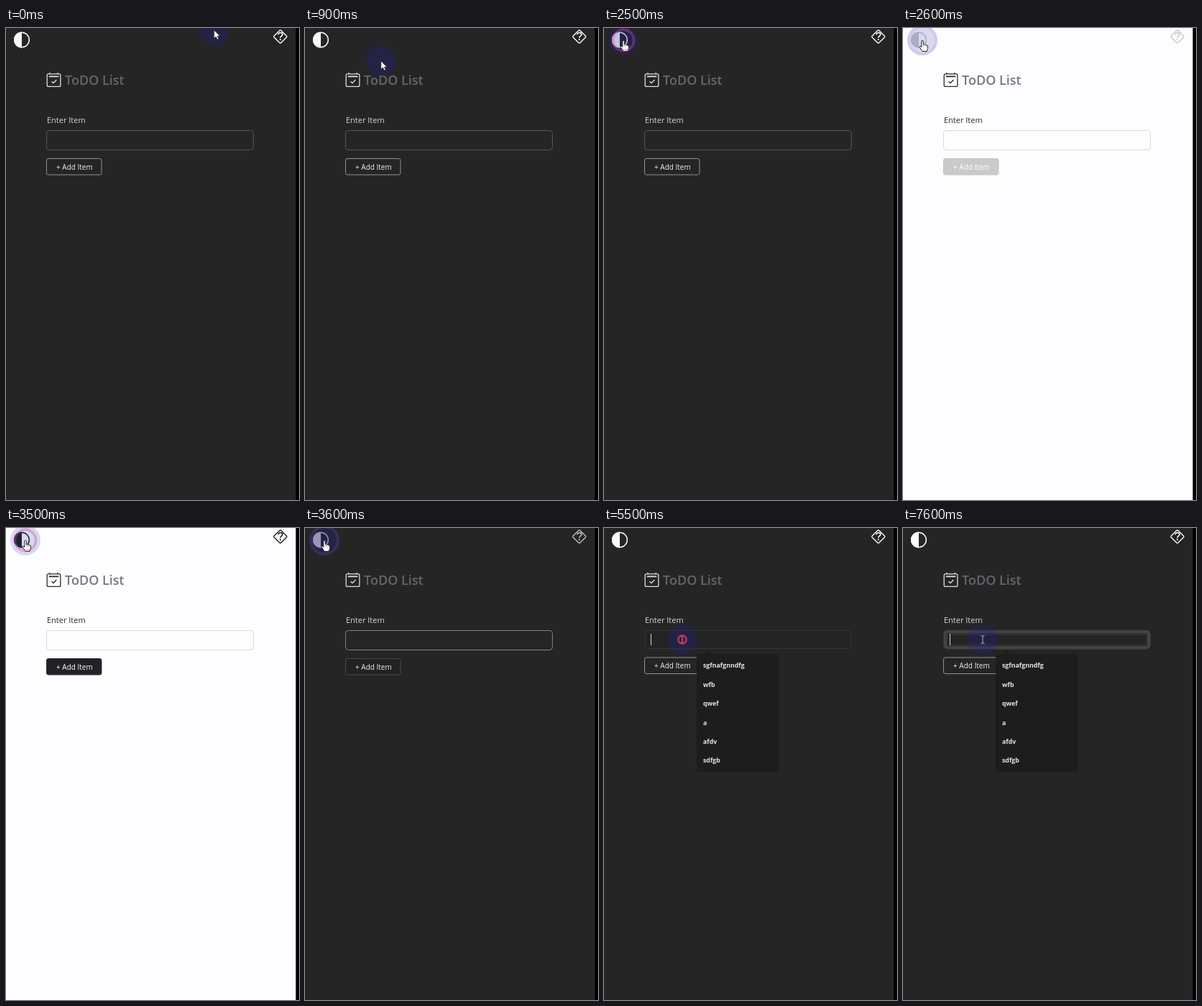
Write an HTML page with a canvas that moves like this. It is 408 by 656 pixels and loops after 8 s.

```html
<!DOCTYPE html>
<html lang="en">
<head>
<meta charset="utf-8">
<title>ToDO List</title>
<style>
  html, body { margin: 0; width: 100%; height: 100%; overflow: hidden; background: #000; }
  canvas { display: block; width: 408px; height: 656px; }
</style>
</head>
<body>
<canvas id="stage" width="408" height="656"></canvas>
<script>
const ctx = document.getElementById('stage').getContext('2d');
const LOOP = 8000;
const THEME_TO_LIGHT = 2550, THEME_TO_DARK = 3550, FOCUS = 5500;
const CLICKS = [2300, 3300, FOCUS];
const SUGGESTIONS = ['sgfnafgnndfg', 'wfb', 'qwef', 'a', 'afdv', 'sdfgb'];
// time, x, y of the pointer
const PATH = [
  [0, 290, 3], [450, 190, 29], [900, 106, 46], [1400, 50, 31], [1800, 27, 17],
  [3800, 27, 17], [3950, 66, 84], [4200, 109, 155], [5500, 109, 155], [5700, 111, 155]
];

const ramp = (t, from, to) => Math.max(0, Math.min(1, (t - from) / (to - from)));
const mix = (a, b, k) => a + (b - a) * k;
const gray = v => `rgb(${v},${v},${v})`;

function pointerAt(t) {
  const next = PATH.findIndex(p => p[0] > t);
  if (next < 0) return PATH[PATH.length - 1].slice(1);
  const a = PATH[next - 1], b = PATH[next], k = ramp(t, a[0], b[0]);
  return [mix(a[1], b[1], k), mix(a[2], b[2], k)];
}

function text(str, x, y, size, weight, color) {
  ctx.font = `${weight} ${size}px "Open Sans", "Noto Sans", sans-serif`;
  ctx.fillStyle = color;
  ctx.fillText(str, x, y);
}

function paint(fill, stroke, width = 1) {
  if (fill) { ctx.fillStyle = fill; ctx.fill(); }
  if (stroke) { ctx.strokeStyle = stroke; ctx.lineWidth = width; ctx.stroke(); }
}

function box(x, y, w, h, r, { fill, stroke, width }) {
  ctx.beginPath();
  ctx.roundRect(x, y, w, h, r);
  paint(fill, stroke, width);
}

function circle(x, y, r, fill, stroke, width) {
  ctx.beginPath();
  ctx.arc(x, y, r, 0, 7);
  paint(fill, stroke, width);
}

function path(d, fill, stroke, width = 1) {
  const p = new Path2D(d);
  if (fill) { ctx.fillStyle = fill; ctx.fill(p); }
  if (stroke) { ctx.strokeStyle = stroke; ctx.lineWidth = width; ctx.stroke(p); }
}

function header(light, iconTone) {
  const icon = gray(iconTone);
  circle(22, 16.5, 10.3, null, icon, 1.5);
  path('M22 5.5A11 11 0 0 0 22 27.5Z', icon);
  path('M381 3.4Q382 2.4 383 3.4L390.6 11Q391.6 12 390.6 13L383 20.6Q382 21.6 381 20.6L373.4 13Q372.4 12 373.4 11Z',
    null, icon, 1.4);
  path('M379.2 9.3C379.3 7.3 380.5 6.5 382 6.5C383.8 6.5 385 7.5 385 9C385 11.2 382 11.3 382 13.7', null, icon, 1.6);
  circle(382, 16.1, 1.05, icon);

  const ink = light ? '#2a2a2e' : '#dedede';
  box(57.2, 63.9, 18.7, 17.5, 2, { stroke: ink, width: 1.3 });
  path('M60.9 62V64M72.1 62V64', null, ink, 1.3);
  path('M59.8 67.4H73.3', null, ink, 1.8);
  path('M63.6 74.2L66 76.4L70.4 72', null, ink, 1.4);
  text('ToDO List', 82, 79, 18, 600, light ? '#73797f' : '#62676e');
  text('Enter Item', 57, 131.5, 11, 400, light ? '#2c2c30' : '#d6d6d6');
}

function form(t, light, lightness) {
  const focused = t >= FOCUS;
  if (focused) {
    box(57, 142.5, 287, 25, 4, { fill: '#242424', stroke: '#363636' });
    ctx.globalAlpha = ramp(t, FOCUS, 5800);
    box(61, 147, 279, 16.5, 3, { stroke: '#303030', width: 4 });
    box(58.5, 144, 284, 22.5, 4, { stroke: '#444', width: 4 });
    ctx.globalAlpha = 1;
    const caretOff = (t >= 6000 && t < 6500) || (t >= 7100 && t < 7600);
    if (!caretOff) {
      ctx.fillStyle = '#d4d4d4';
      ctx.fillRect(65, 147, 1, 16);
    }
  } else {
    box(56.5, 142.5, 288, 27, 4, { stroke: gray(light ? 218 : mix(88, 145, lightness)) });
  }

  const top = focused ? 180 : 181.5;
  box(56.5, top, 76.5, 22.5, 2.5, {
    fill: `rgba(33,34,37,${lightness})`,
    stroke: light && lightness < .5 ? gray(195) : gray(mix(145, 50, lightness))
  });
  text('+ Add Item', 70, top + 15.2, 10, 500, light ? '#fff' : '#f0f0f0');

  if (focused) {
    path('M136 177L144 170L152 177Z', '#1e1e1e');
    box(129, 175.5, 114.5, 163.5, 3, { fill: '#1d1d1d' });
    SUGGESTIONS.forEach((s, i) => text(s, 138, 194.3 + i * 26.4, 8.8, 700, '#e4e4e4'));
  }
}

function pointer(t, light) {
  const [x, y] = pointerAt(t);
  circle(x, y, 21, `rgba(30,30,160,${light ? .16 : .25})`);
  ctx.save();
  ctx.translate(x, y);
  if (t >= 4050) {
    path('M-2.5 -5.5Q0 -5.5 0 -4Q0 -5.5 2.5 -5.5M0 -4V4M-2.5 5.5Q0 5.5 0 4Q0 5.5 2.5 5.5', null, '#b4b4ba');
  } else if (t >= 1700 && t < 3850) {
    ctx.translate(.5, 1);
    path('M-1.7 0Q-.5 -1.8 .8 0V5Q2 4 3 5.4Q4.4 4.6 5.2 6Q7 5.6 7 7.4V10.5L5.6 14.5H-.4L-4.4 8.6Q-4.6 6.8 -3 7.2L-1.7 8.6Z',
      '#fff', '#222226');
    path('M.9 5V8M3 5.5V8.2M5.1 6.2V8.4', null, '#77777b', .6);
  } else {
    path('M0 0V11.3L2.6 8.9L4.4 13L6.3 12.2L4.5 8.2H8Z', '#fff', '#222', .6);
  }
  ctx.restore();

  for (const start of CLICKS) {
    const k = (t - start) / 300;
    if (k < 0 || k > 1.2) continue;
    const e = Math.min(1, k);
    const color = `rgba(${mix(215, 190, e)},${mix(45, 100, e)},${mix(90, 205, e)},${.82 - .67 * k})`;
    circle(x, y, 5.5 + 13.5 * e, null, color, 3 + e);
  }
}

function draw(t) {
  const light = t >= THEME_TO_LIGHT && t < THEME_TO_DARK;
  const toLight = ramp(t, THEME_TO_LIGHT, THEME_TO_LIGHT + 220);
  const lightness = toLight - ramp(t, THEME_TO_DARK, THEME_TO_DARK + 200);
  const iconDark = toLight - ramp(t, THEME_TO_DARK, THEME_TO_DARK + 70);

  ctx.fillStyle = '#000';
  ctx.fillRect(0, 0, 408, 656);
  ctx.fillStyle = light ? '#fdfcfe' : '#262526';
  ctx.fillRect(0, 0, 403.5, 656);
  ctx.lineJoin = 'round';
  header(light, mix(250, 33, iconDark));
  form(t, light, lightness);
  pointer(t, light);
}

const begin = performance.now();
function tick() {
  draw((performance.now() - begin) % LOOP);
  requestAnimationFrame(tick);
}
tick();
</script>
</body>
</html>
```
